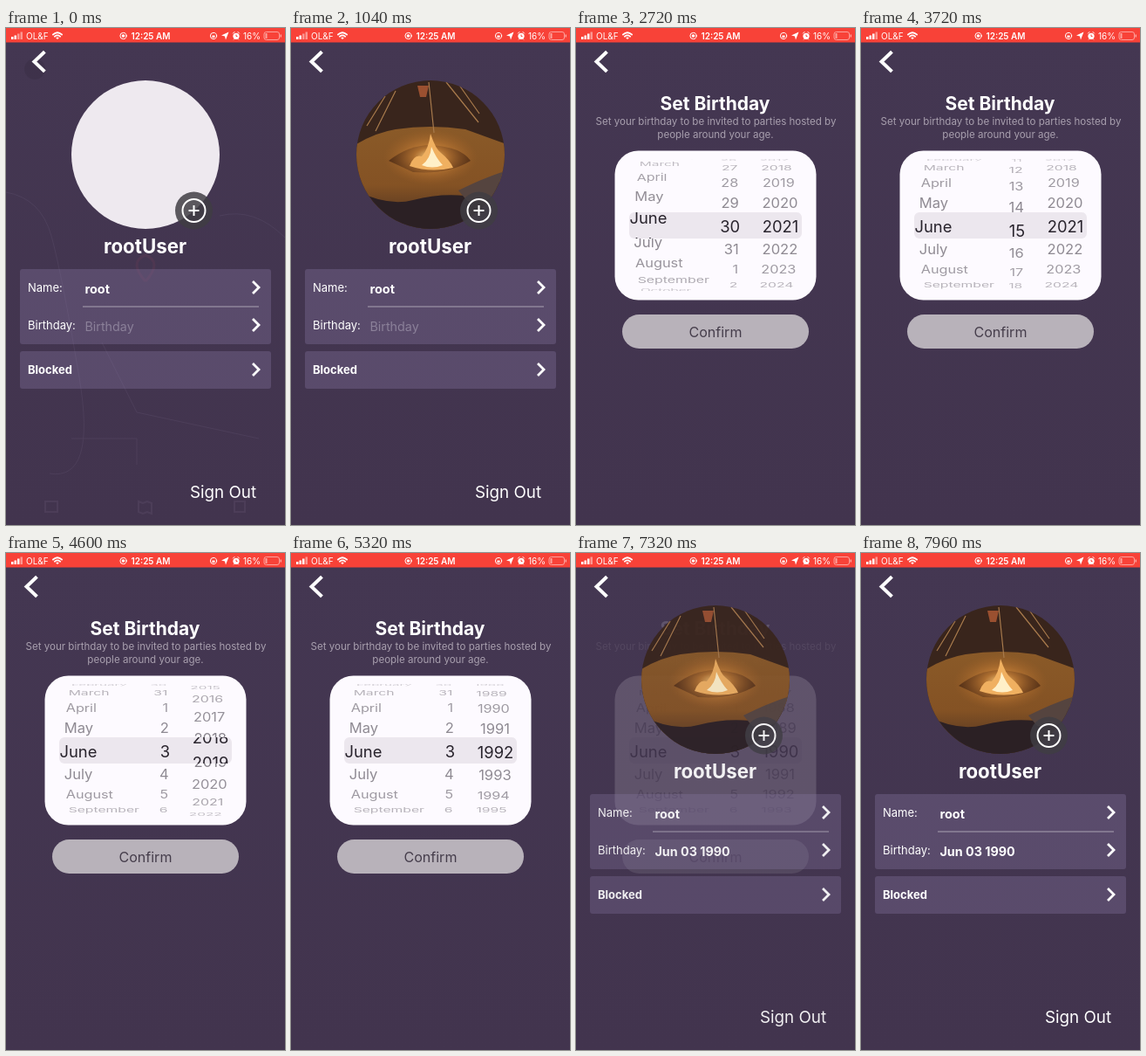
An HTML page for the animation above (8 s loop, 320 by 569 pixels).

```html
<!DOCTYPE html>
<html lang="en">
<head>
<meta charset="utf-8">
<title>Set Birthday</title>
<style>
html, body { margin: 0; height: 100%; overflow: hidden; background: #433450; }
svg { display: block; width: 100vw; height: 100vh; font-family: Inter, "Noto Sans", sans-serif; }
.mid { text-anchor: middle; }
.bold { font-weight: 700; }
.line { fill: none; stroke: #fff; stroke-linecap: square; }
</style>
</head>
<body>
<svg viewBox="0 0 320 569" preserveAspectRatio="none">
  <defs>
    <linearGradient id="bg" x2="0" y2="1"><stop stop-color="#443752"/><stop offset="1" stop-color="#42344e"/></linearGradient>
    <linearGradient id="sand" x2="0" y2="1"><stop stop-color="#8a5a28"/><stop offset=".55" stop-color="#845224"/><stop offset="1" stop-color="#3e2920"/></linearGradient>
    <radialGradient id="glow"><stop stop-color="#ffd98a"/><stop offset=".35" stop-color="#d88c3c" stop-opacity=".7"/><stop offset="1" stop-color="#a86428" stop-opacity="0"/></radialGradient>
    <clipPath id="round"><circle cx="160" cy="145" r="85"/></clipPath>
    <clipPath id="lens"><rect x="45" y="211" width="230" height="30"/></clipPath>
    <clipPath id="outer"><path d="M45 150h230v61H45zM45 241h230v60H45z"/></clipPath>
    <path id="next" class="line" stroke-width="2.8" d="M-3-6L3 0L-3 6"/>
  </defs>

  <rect width="320" height="569" fill="url(#bg)"/>

  <g id="picker">
    <text class="mid bold" x="159.500" y="94" font-size="21" fill="#fff">Set Birthday</text>
    <g class="mid" font-size="11.550" fill="#a89fae">
      <text x="160.500" y="110.500">Set your birthday to be invited to parties hosted by</text>
      <text x="160" y="125.500">people around your age.</text>
    </g>
    <rect x="44.500" y="140.500" width="231" height="171" rx="27" fill="#fdfaff"/>
    <rect x="61" y="211" width="198" height="30" rx="6" fill="#ece7ee"/>
    <g id="rows" clip-path="url(#outer)" font-size="16.700"></g>
    <g id="chosen" clip-path="url(#lens)" font-size="16.700"></g>
    <g id="confirm">
      <rect x="53" y="328" width="214" height="39" rx="19.500" fill="#b8b2ba"/>
      <text class="mid" x="160" y="353.500" font-size="16" fill="#453d4b">Confirm</text>
    </g>
  </g>

  <g id="profile" fill="#fff">
    <g id="map" fill="none" stroke="#c9b8e0">
      <path d="M0 188Q40 195 52 238T84 400T50 510M245 215Q285 205 320 240M110 360L150 440L290 470M75 470H150V500"/>
      <path d="M160 290Q140 268 160 260Q180 268 160 290" stroke="#e05060" stroke-width="3"/>
      <path d="M45 542h14v12h-14zM152 542l5 2 5-2 5 2v12l-5-2-5 2-5-2zM262 542h12v12h-12z" stroke-width="2"/>
      <circle cx="33" cy="47" r="12" fill="#000" stroke="none"/>
    </g>
    <circle id="blank" cx="160" cy="145" r="85" fill="#eee9ef"/>
    <g id="photo" clip-path="url(#round)">
      <rect x="75" y="60" width="170" height="170" fill="#39251c"/>
      <path d="M70 136Q95 120 120 116Q160 110 200 116L250 134V235H70z" fill="url(#sand)"/>
      <path d="M70 184Q110 205 140 197T200 192L250 172V240H70z" fill="#2b2024"/>
      <path d="M192 186Q220 172 245 164V186Q222 202 202 198z" fill="#55443f"/>
      <path d="M112 152Q135 134 160 134Q195 136 206 152Q180 168 140 165z" fill="#4a2a15"/>
      <ellipse cx="160" cy="148" rx="54" ry="32" fill="url(#glow)"/>
      <path d="M87 112L108 78M97 118L120 72M178 62L215 108M192 64L216 98M158 62L164 120" stroke="#a87a4c" stroke-width="1.2"/>
      <path d="M145 66h13l-3 13h-7z" fill="#9a5030"/>
      <path d="M136 158Q141 144 150 147Q158 138 160 121Q166 139 172 143Q182 151 186 160Q160 166 136 158z" fill="#f0b060"/>
      <path d="M150 157Q160 150 161 136Q167 150 174 157Q162 162 150 157z" fill="#fff0c8"/>
    </g>
    <circle cx="215.500" cy="209" r="21.500" fill="#403d43" fill-opacity=".84"/>
    <circle class="line" cx="215.500" cy="209" r="13" stroke-width="2"/>
    <path class="line" stroke-width="2" d="M210.500 209h10M215.500 204v10"/>
    <text class="mid bold" x="159.500" y="257.500" font-size="22.300">rootUser</text>
    <g fill="#8f7fac" fill-opacity=".3">
      <rect x="16" y="276" width="288" height="86" rx="3"/>
      <rect x="16" y="370" width="288" height="43" rx="3"/>
    </g>
    <path d="M88 319H290" stroke="#aaa2b2"/>
    <g font-size="13">
      <text x="25" y="302">Name:</text>
      <text x="25" y="345">Birthday:</text>
      <text class="bold" x="25" y="396">Blocked</text>
    </g>
    <text class="bold" x="90.500" y="303.500" font-size="14.400">root</text>
    <text id="date" x="90.500" y="346.500" font-size="14.300"></text>
    <use href="#next" x="287" y="297"/><use href="#next" x="287" y="340"/><use href="#next" x="287" y="391"/>
    <text x="211" y="537.800" font-size="18.800">Sign Out</text>
  </g>

  <path id="back" class="line" stroke-width="4" d="M34 28.500L23.500 38.500L34 48.500"/>

  <rect width="320" height="16.500" fill="#f84238"/>
  <g fill="#fff" font-size="10">
    <path d="M6 10h2.500v3H6zM9.500 8.500H12V13H9.500z"/>
    <path id="bar" d="M13 6.500h2.500V13H13z"/>
    <path d="M16.500 4.500H19V13h-2.500z" opacity=".45"/>
    <text x="23" y="12.500">OL&amp;F</text>
    <path class="line" stroke-width="1.700" d="M54 7.500Q59 3 64 7.500M56 9.700Q59 7.200 62 9.700"/>
    <path d="M57.200 11.200Q59 9.700 60.800 11.200L59 13z"/>
    <circle class="line" cx="134.500" cy="9" r="3.600"/><circle cx="134.500" cy="9" r="1.800"/>
    <text class="mid" x="166" y="12.500" font-weight="600">12:25 AM</text>
    <circle class="line" cx="238" cy="9" r="3.600"/><path d="M236.500 8.500h3v2.500h-3z"/>
    <path d="M255.500 4.500L252 13.500L251 9.500L247 8.500z"/>
    <circle cx="264" cy="9.300" r="3.600"/>
    <path class="line" d="M260.500 6l1.500-1.500M267.500 6L266 4.500M261.500 13l.5-.5M266.500 13l-.5-.5"/>
    <path d="M264 7.500v2h1.500" fill="none" stroke="#f84238"/>
    <text x="272" y="12.500">16%</text>
    <g opacity=".5">
      <rect x="296" y="4.500" width="17.500" height="9" rx="2.500" fill="none" stroke="#fff"/>
      <path d="M297.500 6h2v6h-2zM314.500 7.500h1.500v3h-1.500z"/>
    </g>
  </g>
</svg>
<script>
const $ = id => document.getElementById(id);
const LOOP = 8000, RADIUS = 77, STEP = Math.PI / 9, MID = 227, ZOOM = 1.1;
const MONTHS = 'January February March April May June July August September October November December'.split(' ');
const wrap = (n, size) => ((n - 1) % size + size) % size;
const clamp = x => Math.min(1, Math.max(0, x));
const smooth = x => x * x * (3 - 2 * x);

// Eased value through [time, value] stops
function at(t, stops) {
  let [from, value] = stops[0];
  for (const [to, next] of stops.slice(1)) {
    if (t < to) return value + (next - value) * smooth(clamp((t - from) / (to - from)));
    [from, value] = [to, next];
  }
  return value;
}

const wheels = [
  { x: 66, centre: 111, anchor: 'start', label: n => MONTHS[wrap(n, 12)],
    stops: [[2040, 9], [2900, 6]] },
  { x: 187, centre: 175, anchor: 'end', label: n => wrap(n, 31) + 1,
    stops: [[2900, 30], [3740, 14.8], [4440, 3]] },
  { x: 234.5, centre: 234.5, anchor: 'middle', label: n => n,
    stops: [[4440, 2021], [5340, 1991.93], [6180, 1989.95], [6360, 1990]] }
];

function addText(parent, x, anchor, fill) {
  const el = document.createElementNS('http://www.w3.org/2000/svg', 'text');
  const attrs = { x, y: 6, 'text-anchor': anchor, fill };
  for (const name in attrs) el.setAttribute(name, attrs[name]);
  return parent.appendChild(el);
}

for (const w of wheels) {
  w.rows = [];
  for (let k = -4; k <= 4; k++) w.rows.push({
    k,
    plain: addText($('rows'), w.x - 160, w.anchor, '#2b2530'),
    big: addText($('chosen'), w.x - w.centre, w.anchor, '#28232c')
  });
}

function turn(w, value) {
  for (const { k, plain, big } of w.rows) {
    const n = Math.round(value) + k, angle = (n - value) * STEP;
    const y = RADIUS * Math.sin(angle), flat = Math.max(0, Math.cos(angle));
    const depth = 600 / (600 + RADIUS * (1 - flat));
    plain.textContent = big.textContent = w.label(n);
    plain.setAttribute('transform', `translate(160 ${MID + y}) scale(${depth} ${depth * flat})`);
    plain.setAttribute('opacity', .12 + .43 * flat);
    big.setAttribute('transform', `translate(${w.centre} ${MID + y * ZOOM}) scale(${ZOOM} ${ZOOM * flat})`);
  }
}

function fade(id, opacity) {
  $(id).setAttribute('opacity', opacity);
  $(id).style.display = opacity ? '' : 'none';
}

function draw() {
  const t = performance.now() % LOOP;
  const opened = clamp((t - 1220) / 400), closed = clamp((t - 6980) / 400);
  fade('picker', opened * (1 - closed));
  fade('profile', 1 - opened + opened * Math.sqrt(closed));
  $('confirm').setAttribute('opacity', t > 6840 && t < 6980 ? .5 : 1);
  for (const w of wheels) turn(w, at(t, w.stops));

  const chosen = t > 6900;
  $('date').textContent = chosen ? 'Jun 03 1990' : 'Birthday';
  $('date').setAttribute('font-weight', chosen ? 700 : 400);
  $('date').setAttribute('fill', chosen ? '#fff' : '#8b8099');

  const entry = 1 - clamp(t / 160);
  $('map').setAttribute('opacity', .07 * entry);
  $('back').setAttribute('transform', `translate(${9 * entry * entry} 0)`);
  fade('blank', t < 440 ? 1 : 0);
  fade('photo', t < 440 ? 0 : 1);
  $('bar').setAttribute('opacity', t < 2060 ? .45 : 1);
  requestAnimationFrame(draw);
}
draw();
</script>
</body>
</html>
```
